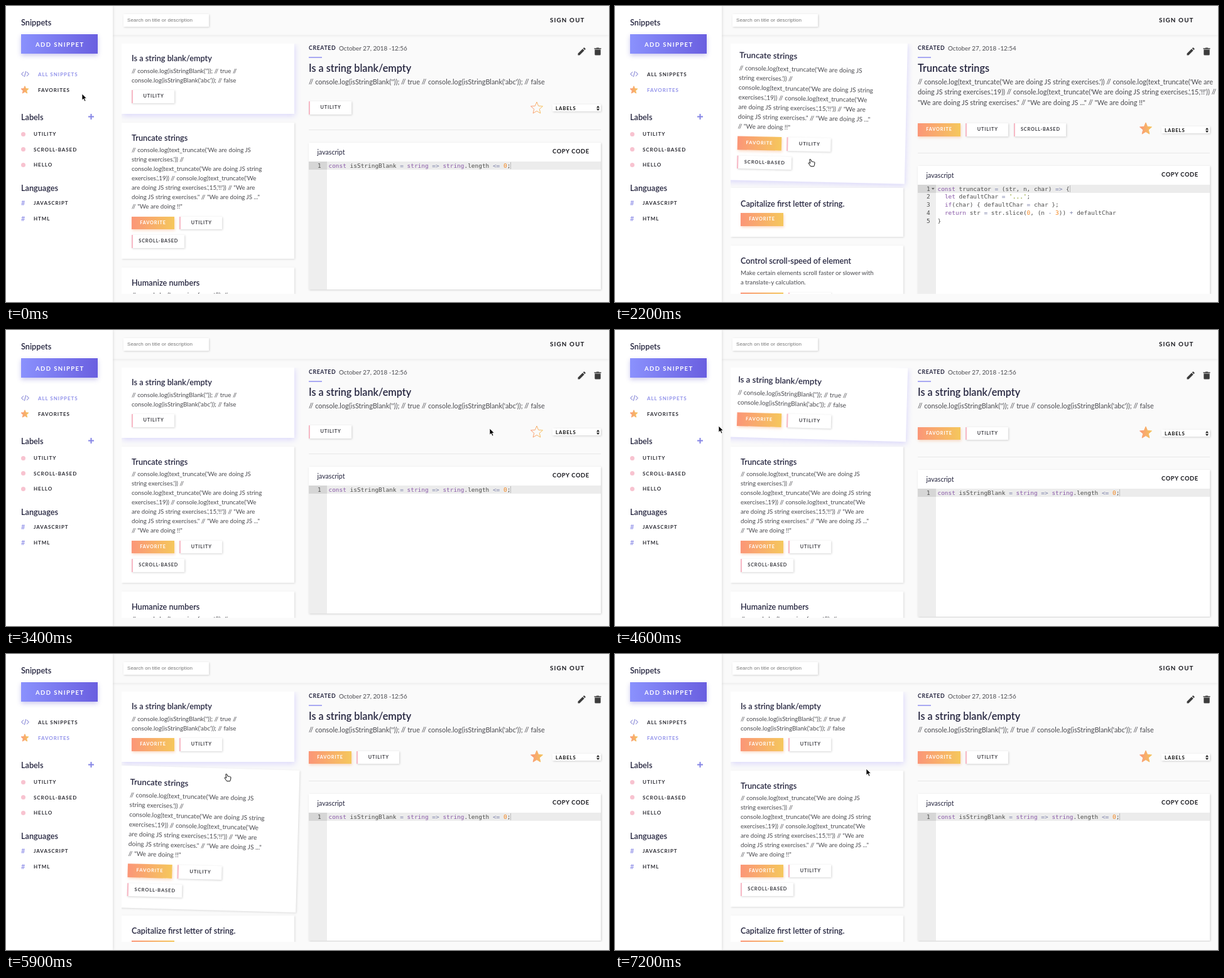
Write an HTML page that moves like this. It is 960 px wide and 472 px high and loops after 7300 ms.

```html
<!DOCTYPE html>
<html lang="en">
<head>
<meta charset="utf-8">
<title>Snippets</title>
<style>
html, body { margin: 0; width: 100%; height: 100%; overflow: hidden; background: #fafafa; }
#stage { position: relative; width: 960px; height: 472px; overflow: hidden; font-family: Lato, sans-serif; color: #4a4a4f; }
#stage div, #stage svg { position: absolute; }
.t { white-space: pre; line-height: 16px; }
.h { font-weight: 600; font-size: 12.7px; color: #25253f; }
.big { font-size: 16.2px; }
.caps { font-weight: 700; font-size: 8px; letter-spacing: .95px; color: #2b2b33; }
.on { color: #9091ea; }
.p { font-size: 9.75px; }
.d { font-size: 10.9px; }
.cmd { font-weight: 700; color: #16161c; }
.mono { font: 9.45px/16px "DejaVu Sans Mono", monospace; color: #4d4d4c; }
.mono b { font-weight: 400; }
.caret { border-left: 1px solid #bbb; }
.side { width: 170px; height: 472px; background: #fff; box-shadow: 0 0 5px rgba(0,0,0,.16); }
.head { left: 170px; width: 790px; height: 46px; background: #fafafa; box-shadow: 0 1px 5px rgba(0,0,0,.07); }
.add { left: 24px; top: 45px; width: 122px; height: 31px; background: linear-gradient(90deg, #8a91fd, #6a5fe0); box-shadow: 0 3px 7px rgba(90,80,200,.3); }
.search { left: 187px; top: 13px; width: 136px; height: 20px; background: #fff; box-shadow: 1px 1px 3px rgba(0,0,0,.16); }
.clip { top: 60px; height: 399px; overflow: hidden; }
.card { left: 0; width: 275px; background: #fff; box-shadow: 1px 1px 3px rgba(0,0,0,.13); }
.card.sel { box-shadow: 1px 3px 9px rgba(120,110,255,.24); }
.tag { box-sizing: border-box; height: 20.5px; font: 700 7.3px/20.5px Lato, sans-serif; letter-spacing: .85px; text-align: center;
  color: #3a3a40; background: #fff; border-left: 2px solid #f7b9c6; box-shadow: 1px 1px 3px rgba(0,0,0,.17); }
.tag.fav { color: #fff; border: 0; background: linear-gradient(90deg, #fb9678, #f5c75c); box-shadow: 1px 2px 4px rgba(240,150,90,.35); }
.dot { left: 24px; width: 7px; height: 7px; border-radius: 50%; background: #f8c3d0; }
.panel { background: #fff; box-shadow: 1px 1px 3px rgba(0,0,0,.17); }
</style>
</head>
<body>
<div id="stage"></div>
<script>
const LOOP = 7300;
const stage = document.getElementById('stage');

const text = (x, y, str, cls, css = '') =>
  `<div class="t ${cls}" style="left:${x}px;top:${y - 8}px;${css}">${str}</div>`;
const box = (x, y, w, h, css, cls = '') =>
  `<div class="${cls}" style="left:${x}px;top:${y}px;width:${w}px;height:${h}px;${css}"></div>`;
const icon = (x, y, w, h, body) =>
  `<svg style="left:${x}px;top:${y}px;overflow:visible" width="${w}" height="${h}">${body}</svg>`;

const gradient = `<defs><linearGradient id="warm"><stop stop-color="#fb9878"/><stop offset="1" stop-color="#f4c45c"/></linearGradient></defs>`;
const star = (x, y, r, filled) => {
  const points = [...Array(10).keys()].map(i => {
    const a = i * Math.PI / 5, k = i % 2 ? r * .45 : r;
    return `${(k * Math.sin(a)).toFixed(2)},${(-k * Math.cos(a)).toFixed(2)}`;
  }).join(' ');
  return icon(x, y + r * .07, 1, 1, `<polygon points="${points}" fill="${filled ? 'url(#warm)' : 'none'}" stroke="url(#warm)" stroke-width="1" stroke-linejoin="round"/>`);
};

// Tags flow to the right and wrap at the given width.
const tags = (x, y, names, room) => {
  let dx = 0, dy = 0;
  return names.map(name => {
    const w = name.length > 8 ? 83.5 : 68;
    if (dx + w > room) { dx = 0; dy += 29.6; }
    const html = `<div class="tag ${name === 'FAVORITE' ? 'fav' : ''}" style="left:${x + dx}px;top:${y + dy - 10.2}px;width:${w}px">${name}</div>`;
    dx += w + 8.3;
    return html;
  }).join('');
};

const blank = {
  title: 'Is a string blank/empty', height: 112.8, tags: ['UTILITY'], time: '12:56',
  lines: ["// console.log(isStringBlank('')); // true //", "console.log(isStringBlank('abc')); // false"],
  wide: ["// console.log(isStringBlank('')); // true // console.log(isStringBlank('abc')); // false"],
  code: ['const isStringBlank = string => string.length <= 0;'],
  tagY: 162.5, starY: 162.5, selectY: 162.5, rule: 196.5, panelY: 218
};
const blankFav = { ...blank, tags: ['FAVORITE', 'UTILITY'], tagY: 165, starY: 163, selectY: 164.5, rule: 201.5, panelY: 223 };
const truncate = {
  title: 'Truncate strings', height: 217.7, tags: ['FAVORITE', 'UTILITY', 'SCROLL-BASED'], time: '12:54',
  lines: ["// console.log(text_truncate('We are doing JS", "string exercises.')) //", "console.log(text_truncate('We are doing JS string",
    "exercises.',19)) // console.log(text_truncate('We", "are doing JS string exercises.',15,'!!')) // \"We are",
    'doing JS string exercises." // "We are doing JS ..."', '// "We are doing !!"'],
  wide: ["// console.log(text_truncate('We are doing JS string exercises.')) // console.log(text_truncate('We are",
    "doing JS string exercises.',19)) // console.log(text_truncate('We are doing JS string exercises.',15,'!!')) //",
    '"We are doing JS string exercises." // "We are doing JS ..." // "We are doing !!"'],
  code: ['const truncator = (str, n, char) => {', "  let defaultChar = '...';", '  if(char) { defaultChar = char };',
    '  return str = str.slice(0, (n - 3)) + defaultChar', '}'],
  tagY: 197.5, starY: 195.5, selectY: 197.5, rule: 234, panelY: 255
};
const capitalize = { title: 'Capitalize first letter of string.', height: 78, tags: ['FAVORITE'], lines: [] };
const control = {
  title: 'Control scroll-speed of element', height: 112.8, tags: ['FAVORITE', 'UTILITY'],
  lines: ['Make certain elements scroll faster or slower with', 'a translate-y calculation.']
};
const humanize = { title: 'Humanize numbers', height: 112.8, tags: [], lines: ['// console.log(humanize_format()); //'] };

const views = [
  { from: 0, cards: [blank, truncate, humanize] },
  { from: 900, cards: [truncate, capitalize, control], fav: true },
  { from: 2700, cards: [blank, truncate, humanize] },
  { from: 4100, cards: [blankFav, truncate, humanize] },
  { from: 5050, cards: [blankFav, truncate, capitalize], fav: true }
];
const tops = view => view.cards.map((_, i) => view.cards.slice(0, i).reduce((y, c) => y + c.height + 13.5, 59.2));

const card = (c, top, selected) => `<div class="card ${selected ? 'sel' : ''}" style="top:${top - 60}px;height:${c.height}px">
  ${text(16, 24.2, c.title, 'h')}
  ${c.lines.map((line, i) => text(16, 43.6 + i * 15, line, 'p')).join('')}
  ${tags(16, c.lines.length ? 55.3 + c.lines.length * 15 : 50.3, c.tags, 220)}</div>`;

const highlight = line => line.replace(/\b(?:const|let|if|return|string)\b|=>|<=|[=+-]|'[^']*'|\b\d\b/g, m => {
  const color = /^[a-z]/.test(m) ? '#8959a8' : /\d/.test(m) ? '#f5871f' : m[0] === "'" ? '#718c00' : '#7a7fa8';
  return `<b style="color:${color}">${m.replace('<', '&lt;')}</b>`;
});

const detail = c => {
  const y = c.panelY, editor = y + 30, full = c.tags.includes('FAVORITE');
  return `<div class="clip" style="left:470px;width:490px"><div style="left:-470px;top:-60px">
  ${text(482, 67, 'CREATED', 'cmd', 'font-size:8.8px;letter-spacing:.6px;color:#25253f')}
  ${text(530, 67, `October 27, 2018 -${c.time}`, '', 'font-size:9.85px')}
  ${box(482, 81, 21, 1.5, 'background:#a9a9f2')}
  ${text(482, 99, c.title, 'h big')}
  ${c.wide.map((line, i) => text(482, 121 + i * 16.3, line, 'd')).join('')}
  ${tags(482, c.tagY, c.tags, 400)}
  ${star(845, c.starY, 10, full)}
  ${box(870, c.selectY - 5.5, 77, 11, '', 'panel')}
  ${text(875, c.selectY + .5, 'LABELS', 'caps', 'font-size:7.8px;letter-spacing:.85px;color:#111')}
  ${icon(940, c.selectY - 4, 5, 8, '<path d="M0 3.2L2.5 0 5 3.2zM0 4.8L2.5 8 5 4.8z" fill="#222"/>')}
  ${box(482, c.rule, 465, 1, 'background:#e8e8e8')}
  ${box(482, y, 465, 234, '', 'panel')}
  ${text(495.5, y + 14.5, 'javascript', '', 'font-size:10.6px;color:#25253f')}
  ${text(870, y + 14, 'COPY CODE', 'cmd', 'font-size:9.4px;letter-spacing:.6px')}
  ${box(482, editor, 28.5, 204, 'background:#eee')}
  ${box(482, editor, 28.5, 13, 'background:#d6d6d6')}
  ${box(510.5, editor, 436.5, 13, 'background:#ececec')}
  ${c.code.map((line, i) => text(496, editor + 6.5 + i * 12.9, i + 1, 'mono')
    + text(513.5, editor + 6.5 + i * 12.9, highlight(line) + (i ? '' : '<i class="caret"></i>'), 'mono')).join('')}
  ${c.code.length > 1 ? icon(504, editor + 5, 5, 3, '<path d="M0 0h4.5L2.2 3z" fill="#666"/>') : ''}
  </div></div>`;
};

const row = (y, label) => text(44, y, label, 'caps');
const sidebar = `<div class="side"></div>
  ${text(24, 26, 'Snippets', 'h')}<div class="add"></div>
  ${text(47, 61.5, 'ADD SNIPPET', 'cmd', 'font-size:9.6px;letter-spacing:1.4px;color:#fff')}
  ${icon(24, 104, 13, 9, '<path d="M4 1L.8 4.5 4 8M9 1l3.2 3.5L9 8M7.6 0L5.4 9" fill="none" stroke="#8b8bd8" stroke-width="1.1"/>')}
  ${star(30.3, 134, 6.3, true)}
  ${text(24, 176.5, 'Labels', 'h')}
  ${icon(130.5, 172, 9, 9, '<path d="M4.5 0v9M0 4.5h9" stroke="#8585e6" stroke-width="2"/>')}
  ${['UTILITY', 'SCROLL-BASED', 'HELLO'].map((s, i) => row(204 + i * 24.5, s) + box(24, 200.5 + i * 24.5, 7, 7, '', 'dot')).join('')}
  ${text(24, 289.5, 'Languages', 'h')}
  ${['JAVASCRIPT', 'HTML'].map((s, i) => row(314 + i * 24.5, s) + text(24, 314 + i * 24.5, '#', '', 'font-size:11px;color:#8585e6')).join('')}`;

const header = `<div class="head"></div><div class="search"></div>
  ${text(193, 23.3, 'Search on title or description', '', 'font:8px/16px Liberation Sans,Arial,sans-serif;letter-spacing:.09px;color:#777')}
  ${text(866, 22, 'SIGN OUT', 'cmd', 'font-size:9.8px;letter-spacing:1.15px')}
  ${icon(910, 66, 13, 13, '<path d="M.5 12.5V9.8L8 2.3 10.7 5 3.2 12.5zM8.7 1.6L9.9.5q.5-.4 1 0l1.6 1.6q.4.5 0 1l-1.1 1.2z" fill="#3c3c3c"/>')}
  ${icon(936, 66, 12, 13, '<path d="M.5 1.2h3L4.3.4h3.4l.8.8h3v1.5H.5zM1.3 3.5h9.4v7.7q0 1.4-1.4 1.4H2.7q-1.4 0-1.4-1.4z" fill="#3c3c3c"/>')}`;

const page = view => `<div class="view">
  ${text(51, 108.5, 'ALL SNIPPETS', `caps ${view.fav ? '' : 'on'}`)}
  ${text(51, 134, 'FAVORITES', `caps ${view.fav ? 'on' : ''}`)}
  <div class="clip" style="left:184px;width:290px">${view.cards.map((c, i) => card(c, tops(view)[i], !i)).join('')}</div>
  ${detail(view.cards[0])}</div>`;

stage.innerHTML = icon(0, 0, 1, 1, gradient) + header + sidebar + views.map(page).join('')
  + icon(0, 0, 1, 1, `<path id="arrow" d="M0 0V10.2L2.4 8 4.2 12 6 11.2 4.2 7.3H7.4z" fill="#000" stroke="#fff" stroke-width=".8"/>
    <path id="hand" d="M-1.2.8q1.2-1.2 2 .2L2 4.2q1-.8 1.8.2 1-.6 1.6.4 1.4-.4 1.6 1l-.4 3.4-1 2.6H.6L-1.4 9-3 6.6q.2-1.2 1.6-.6L-.2 7z" fill="#fff" stroke="#111" stroke-width="1" stroke-linejoin="round"/>`);

const pages = [...stage.querySelectorAll('.view')];
const cards = pages.map(p => [...p.querySelectorAll('.card')]);
const arrow = document.getElementById('arrow'), hand = document.getElementById('hand');

// Pointer stops: time, x, y.
const path = [[0, 121, 140], [200, 121, 140], [800, 90, 136], [1600, 90, 136], [2200, 311, 244], [2300, 311, 244],
  [2650, 80, 109], [2850, 80, 109], [3400, 770, 157], [3800, 845, 163], [4110, 845, 163], [4600, 165, 153],
  [4900, 88, 135], [5150, 88, 135], [5500, 172, 202], [5900, 351, 191], [6500, 365, 215], [7200, 400, 183], [LOOP, 400, 183]];
// Card hovers: card index, enter and leave times.
const hovers = [[0, 1980, 2420], [0, 4230, 4500], [1, 5640, 6700]];

const ease = u => { u = Math.min(1, Math.max(0, u)); return u * u * (3 - 2 * u); };

function pointer(t) {
  const i = path.findIndex(stop => stop[0] > t);
  const [t0, x0, y0] = path[i - 1], [t1, x1, y1] = path[i];
  const k = ease((t - t0) / (t1 - t0));
  return [x0 + (x1 - x0) * k, y0 + (y1 - y0) * k];
}

function render(now) {
  const t = now % LOOP;
  const current = views.findLastIndex(v => t >= v.from), view = views[current];
  pages.forEach((p, i) => p.style.display = i === current ? '' : 'none');

  cards[current].forEach((el, i) => {
    const k = hovers.reduce((sum, [n, enter, leave]) => n === i ? sum + ease((t - enter) / 370) - ease((t - leave) / 370) : sum, 0);
    el.style.transform = k > .001 ? `rotate(${2 * k}deg) scale(${1 + .05 * k})` : '';
  });

  const [x, y] = pointer(t);
  const onLink = x > 24 && x < 118 && y > 100 && y < 142;
  const onStar = Math.hypot(x - 845, y - 163) < 11;
  const onCard = x > 184 && x < 459 && tops(view).some((top, i) => y > top && y < top + view.cards[i].height);
  const pointing = onLink || onStar || onCard;
  arrow.style.display = pointing ? 'none' : '';
  hand.style.display = pointing ? '' : 'none';
  (pointing ? hand : arrow).setAttribute('transform', `translate(${x},${y})`);
  requestAnimationFrame(render);
}
requestAnimationFrame(render);
</script>
</body>
</html>
```
